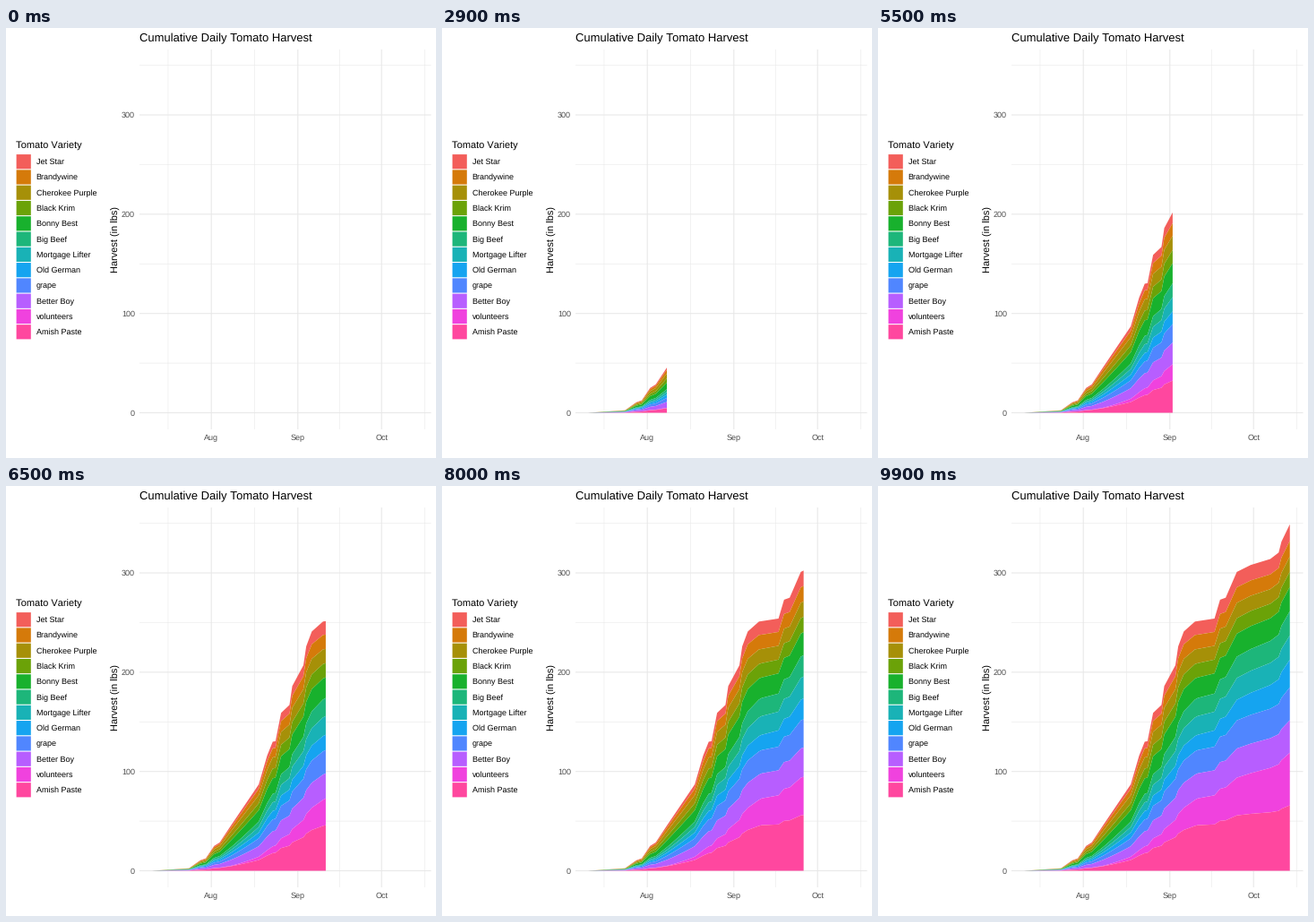
Recreate the animation shown at these times as a matplotlib script. Size 480x480 px, loop 10 s.

```python
import numpy as np
import matplotlib.pyplot as plt
from matplotlib.animation import FuncAnimation
from matplotlib.patches import Polygon, Rectangle

plt.rcParams["font.family"] = "Liberation Sans"
plt.rcParams["text.hinting"] = "none"
plt.rcParams["text.hinting_factor"] = 1

SIZE, DPI = 480, 72
FRAMES, INTERVAL = 100, 100
LAST_DAY = 95  # counted from 11 July
LEFT, RIGHT, TOP, BOTTOM = 149, 474.5, 24, 448

# Name, colour and percent of the harvest early, midway and at the end
SHARE_DAYS = (28, 62, LAST_DAY)
VARIETIES = [
    ("Jet Star", "#F35E5A", (5, 5.4, 4.8)),
    ("Brandywine", "#D57A0A", (8, 5.7, 4.5)),
    ("Cherokee Purple", "#A69008", (11, 5.7, 4.4)),
    ("Black Krim", "#6BA208", (9, 5.7, 4.4)),
    ("Bonny Best", "#18B12D", (15, 8.2, 7)),
    ("Big Beef", "#1DB67A", (6, 7.2, 7)),
    ("Mortgage Lifter", "#19B2B6", (6, 7.5, 7)),
    ("Old German", "#15A4F0", (7, 6.1, 8)),
    ("grape", "#5086FF", (9, 9.3, 9.5)),
    ("Better Boy", "#B75EFF", (13, 10, 9.4)),
    ("volunteers", "#F042DE", (1, 10.7, 15.2)),
    ("Amish Paste", "#FF479F", (10, 18.2, 18.9)),
]

# Cumulative pounds on the days where the picking rate turns
HARVEST = [
    (0, 0), (13, 2.5), (17, 10.5), (19, 12.5), (22, 25), (24, 28.5),
    (28, 45.5), (38, 87), (41, 116), (43, 130), (44, 130.5), (46, 159),
    (49, 167), (50, 186), (54, 207), (55, 226), (57, 241), (61, 251),
    (68, 254), (70, 273), (72, 275), (76, 301), (81, 308), (88, 314),
    (91, 320.5), (92, 331.5), (95, 349),
]


def px(day):
    return 163.8 + 3.115 * day


def py(lbs):
    return 429.5 - 1.1083 * lbs


def stack_edges(days):
    """Layer edges in pounds, from the top of the stack down to zero."""
    total = np.interp(days, *zip(*HARVEST))
    shares = np.array([np.interp(days, SHARE_DAYS, s)
                       for _, _, s in VARIETIES])
    shares /= shares.sum(axis=0)
    above = np.vstack([np.zeros(len(days)), np.cumsum(shares, axis=0)])
    return total * (1 - above)


days = np.arange(LAST_DAY + 1)
edges = stack_edges(days)

fig = plt.figure(figsize=(SIZE / DPI, SIZE / DPI), dpi=DPI, facecolor="white")
ax = fig.add_axes([0, 0, 1, 1])
ax.set(xlim=(0, SIZE), ylim=(SIZE, 0))
ax.axis("off")


def grid(days_at, lbs_at, width):
    style = dict(color="#E8E8E8", lw=width, snap=False,
                 solid_capstyle="butt", zorder=1)
    for d in days_at:
        ax.plot([px(d)] * 2, [TOP, BOTTOM], **style)
    for v in lbs_at:
        ax.plot([LEFT, RIGHT], [py(v)] * 2, **style)


def label(x, y, text, size, color="black", **kw):
    ax.text(x, y, text, fontsize=size, color=color,
            **{"va": "baseline", **kw})


grid([5.5, 36.5, 67, 97.5], range(50, 400, 100), 0.55)
grid([21, 52, 82], range(0, 400, 100), 1.07)

label(149, 15, "Cumulative Daily Tomato Harvest", 13.4)
label(127.8, 236, "Harvest (in lbs)", 11, rotation=90, ha="right",
      va="center")
for v in range(0, 400, 100):
    label(144, py(v) + 3.2, str(v), 8.8, "#4D4D4D", ha="right")
for d, month in ((21, "Aug"), (52, "Sep"), (82, "Oct")):
    label(px(d), 460.3, month, 8.8, "#4D4D4D", ha="center")

label(11, 134.3, "Tomato Variety", 11.1)
layers = []
for i, (name, color, _) in enumerate(VARIETIES):
    y = 149.2 + 17.28 * i
    ax.add_patch(Rectangle((11.6, y - 8.1), 16.2, 16.2, fc=color, lw=0,
                           snap=False))
    label(33.6, y + 3.1, name, 8.6)
    layer = Polygon(np.zeros((3, 2)), fc=color, lw=0, zorder=3)
    layers.append(ax.add_patch(layer))


def update(frame):
    n = round(LAST_DAY * frame / (FRAMES - 1)) + 1
    x = px(days[:n])
    for layer, upper, lower in zip(layers, edges, edges[1:]):
        top = np.column_stack([x, py(upper[:n])])
        base = np.column_stack([x, py(lower[:n])])
        layer.set_xy(np.vstack([top, base[::-1]]))
        layer.set_visible(n > 1)
    return layers


anim = FuncAnimation(fig, update, frames=FRAMES, interval=INTERVAL,
                     repeat=True, repeat_delay=0)
plt.show()
```
